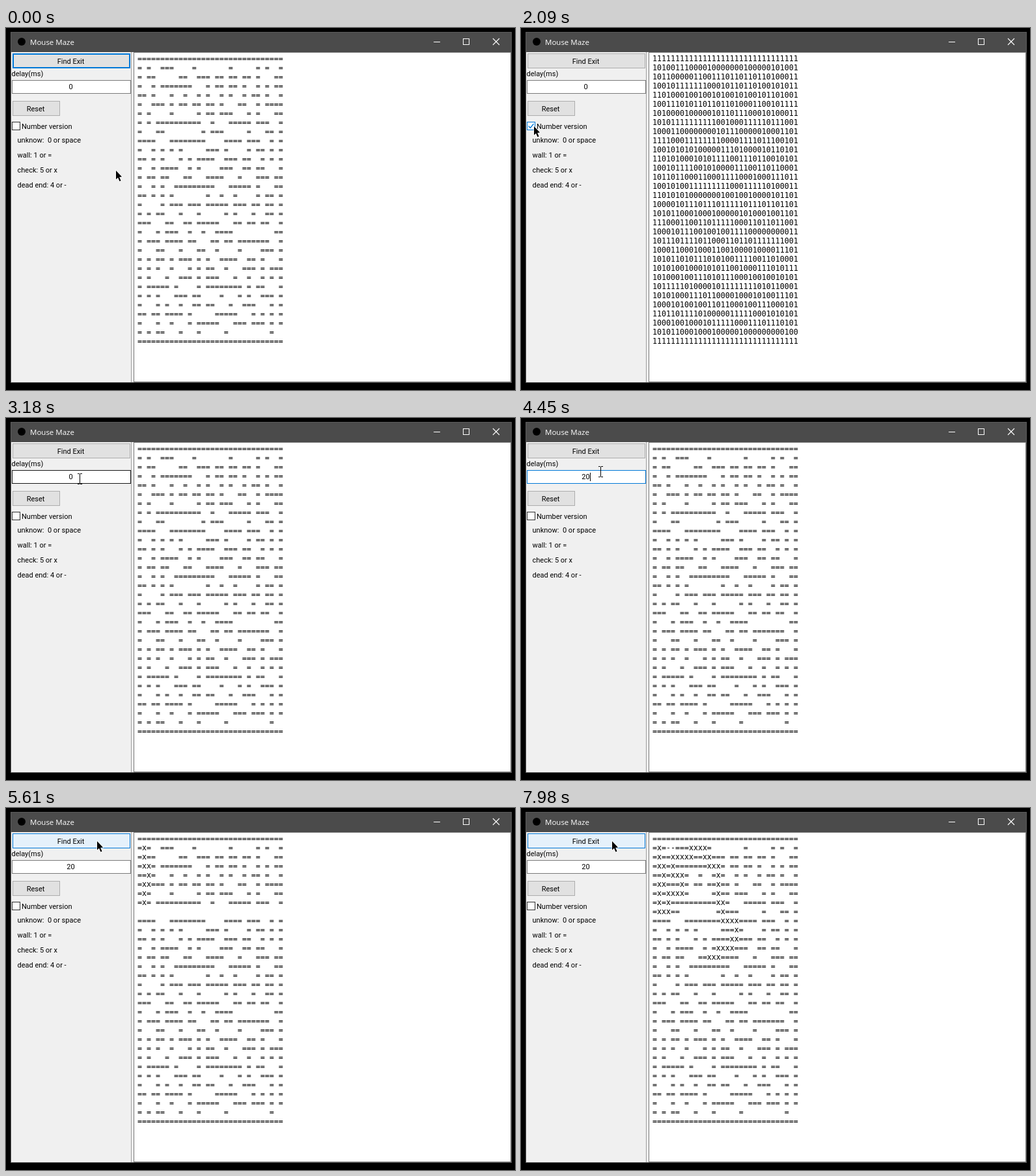
Write an HTML page with a canvas that moves like this. It is 782 px wide and 556 px high and loops after 8000 ms.

```html
<!DOCTYPE html>
<html lang="en">
<head>
<meta charset="utf-8">
<title>Mouse Maze</title>
<style>
html, body { margin: 0; width: 100%; height: 100%; overflow: hidden; background: #000; }
canvas { display: block; }
</style>
</head>
<body>
<canvas id="stage" width="782" height="556"></canvas>
<script>
const LOOP = 8000;
const ctx = document.getElementById('stage').getContext('2d');
const UI = '11px Roboto, "Open Sans", sans-serif';
const TITLE = '11.5px "Open Sans", "Noto Sans", sans-serif';
const MONO = '11.628px "DejaVu Sans Mono", monospace';

// The text shown in the window; the exit is the gap at the lower right
const EDGE = '='.repeat(32);
const MAZE = `${EDGE}
= =  ===    =       =     = =  =
= ==     ==  === == == == =   ==
=  = =======   = == == =  = = ==
== =   =  =  = =  = =  = == =  =
=  === = == == == =   ==  = ====
= =    =     = == ===   = =   ==
= = ==========  =   ===== ===  =
=   ==        = ===     =   == =
====   ========    ==== ===  = =
=  = = = =     === =    = == = =
== = =   = = ====  === ==  = = =
=  = ====  = =    ===  == ==   =
= == ==   ==   ====   =   === ==
=  = =  =========   ===== =   ==
== = = =       =  =  =    = == =
=    = === === ===== === == == =
= = ==   =   =     = =   =  == =
===   ==  == =====   == == ==  =
=   = ===  =  =  ====         ==
= === ==== ==   == == =======  =
=   ==   =   ==  =    =    === =
= = == = === = =  ====  == =   =
= = =  =   = = ==  =   === = ===
= =   =  === = ===   =  =  = = =
= ===== =    = ======== = ==   =
= = =   === ==    =   = =  === =
=   = =  =  == ==   =  ===   = =
== == ==== =     =====   = = = =
=   =  =   = =====   === === = =
= = ==   =   =     =         =
${EDGE}`.split('\n').map(row => row.padEnd(32));

// Depth-first search: up, right, down, left
const DIRS = [[-1, 0], [0, 1], [1, 0], [0, -1]];
const START = 5178.8, STEP = 46.8, MAX_STEPS = 60;

function solve() {
  const grid = MAZE.map(row => [...row]);
  const steps = [];
  let bumped = -1;
  const mark = (r, c, ch) => {
    grid[r][c] = ch;
    steps.push({ r, c, ch, bumped });
    bumped = -1;
  };
  const visit = (r, c) => {
    mark(r, c, 'x');
    for (const [dr, dc] of DIRS) {
      const cell = grid[r + dr][c + dc];
      if (cell === '=') bumped = r + dr;
      if (cell === ' ') visit(r + dr, c + dc);
      if (steps.length >= MAX_STEPS) return;
    }
    mark(r, c, '-');
  };
  visit(1, 1);
  return steps.slice(0, MAX_STEPS);
}
const STEPS = solve();

// Pointer moves: start, end, target x, target y
const HOME = [169, 219];
const MOVES = [
  [755, 1310, 20, 151],
  [2770, 3180, 113, 93],
  [3180, 3300, 115, 91],
  [4420, 4450, 122, 82],
  [4450, 4900, 140, 51]
];

function pointerAt(t) {
  let [x, y] = HOME;
  for (const [from, to, tx, ty] of MOVES) {
    const u = Math.min(1, Math.max(0, (t - from) / (to - from)));
    const k = u * u * (3 - 2 * u);
    x += (tx - x) * k;
    y += (ty - y) * k;
  }
  return [Math.round(x), Math.round(y)];
}

const within = (t, a, b) => t >= a && t < b;

function fill(x, y, w, h, color) {
  ctx.fillStyle = color;
  ctx.fillRect(x, y, w, h);
}

function box(x, y, w, h, border, inner, line = 1) {
  fill(x, y, w, h, border);
  fill(x + line, y + line, w - 2 * line, h - 2 * line, inner);
}

function text(s, x, y, font = UI, color = '#000', align = 'left') {
  ctx.font = font;
  ctx.fillStyle = color;
  ctx.textAlign = align;
  ctx.fillText(s, x, y);
}

function trace(points, color, width, close) {
  ctx.beginPath();
  points.forEach(([x, y]) => ctx.lineTo(x, y));
  if (close) ctx.closePath();
  ctx.strokeStyle = color;
  ctx.lineWidth = width;
  ctx.stroke();
}

function button(label, x, y, w, h, state) {
  const [border, inner, line] = {
    normal: ['#adadad', '#e1e1e1', 1],
    focus: ['#0078d7', '#e1e1e1', 2],
    hover: ['#0078d7', '#e5f1fb', 1],
    press: ['#005499', '#cce4f7', 1]
  }[state];
  box(x, y, w, h, border, inner, line);
  text(label, x + w / 2 - 1, y + 16, UI, '#000', 'center');
}

function drawWindow() {
  fill(0, 0, 782, 556, '#000');
  box(7, 6, 770, 539, '#5c5c5c', '#f0f0f0');
  fill(8, 7, 768, 30, '#4b4b4b');
  ctx.beginPath();
  ctx.arc(24, 21, 6, 0, Math.PI * 2);
  ctx.fillStyle = '#000';
  ctx.fill();
  text('Mouse Maze', 37, 26, TITLE, '#fff');
  fill(657, 21, 10, 1, '#fff');
  box(702, 16, 10, 10, '#fff', '#4b4b4b');
  trace([[748, 16], [758, 26]], '#fff', 1.1);
  trace([[758, 16], [748, 26]], '#fff', 1.1);
  fill(192, 37, 1, 507, '#a0a0a0');
  box(196, 37, 580, 507, '#7a7a7a', '#fff');
}

function drawCheckbox(t, over) {
  const pressed = within(t, 1900, 2020) || within(t, 2450, 2570);
  box(9, 144, 13, 13, pressed ? '#005499' : over ? '#0078d7' : '#333',
    pressed ? '#cce4f7' : '#fff');
  if (within(t, 2020, 2570)) {
    trace([[11.5, 150.5], [14.3, 153.5], [19.5, 147]], pressed ? '#005499' : '#0078d7', 1.3);
  }
  text('Number version', 24, 155);
}

function drawEntry(t, over) {
  const focused = within(t, 3670, 5080);
  const value = t < 3790 ? '0' : t < 3870 ? '' : t < 3950 ? '2' : '20';
  box(9, 80, 183, 21, focused ? '#0078d7' : over ? '#171717' : '#7a7a7a', '#fff');
  text(value, 99.5, 94, UI, '#000', 'center');
  if (focused && !within(t, 4550, 4850)) {
    fill(Math.round(100 + ctx.measureText(value).width / 2), 84, 1, 13, '#000');
  }
}

function drawPanel(t, x, y) {
  const overFind = y >= 39 && y < 62 && x < 191;
  const overReset = y >= 112 && y < 135 && x >= 10 && x < 83;
  const overCheck = y >= 142 && y < 160 && x < 102;
  const overEntry = y >= 80 && y < 101 && x < 192;
  const find = t < 1900 ? 'focus' : within(t, 5080, 5290) ? 'press' : overFind ? 'hover' : 'normal';
  button('Find Exit', 10, 39, 181, 23, find);
  text('delay(ms)', 8.5, 74);
  drawEntry(t, overEntry);
  button('Reset', 10, 112, 73, 23, overReset ? 'hover' : 'normal');
  drawCheckbox(t, overCheck);
  ['unknow:  0 or space', 'wall: 1 or =', 'check: 5 or x', 'dead end: 4 or -']
    .forEach((s, i) => text(s, 17.5, 176 + 23 * i));
  return overEntry;
}

function drawMaze(t) {
  const numeric = within(t, 2040, 2590);
  const rows = MAZE.map(row => [...(numeric ? row.replace(/=/g, '1').replace(/ /g, '0') : row)]);
  let blank = -1;
  STEPS.forEach(({ r, c, ch, bumped }, i) => {
    const age = t - START - i * STEP;
    if (age >= 25) rows[r][c] = ch;
    else if (age >= 4) blank = r;
    else if (age >= 0) blank = bumped;
  });
  rows.forEach((row, i) => {
    if (i !== blank) text(row.join(''), 202, 51 + 14 * i, MONO);
  });
}

function drawPointer(x, y, beam) {
  if (beam) {
    fill(x, y - 7, 1, 15, '#000');
    for (const end of [-8, 8]) {
      fill(x - 3, y + end, 3, 1, '#000');
      fill(x + 1, y + end, 3, 1, '#000');
    }
    return;
  }
  const arrow = [[0, 0], [0, 13.5], [3, 10.8], [5.5, 16.5], [7.5, 15.6], [5.2, 10], [9, 9.6]]
    .map(([dx, dy]) => [x + dx, y + dy]);
  trace(arrow, '#fff', 1.4, true);
  ctx.fillStyle = '#000';
  ctx.fill();
}

function draw(now) {
  const t = now % LOOP;
  const [x, y] = pointerAt(t);
  drawWindow();
  const beam = drawPanel(t, x, y);
  drawMaze(t);
  drawPointer(x, y, beam);
}

const began = performance.now();
function tick() {
  draw(performance.now() - began);
  requestAnimationFrame(tick);
}
tick();
</script>
</body>
</html>
```
